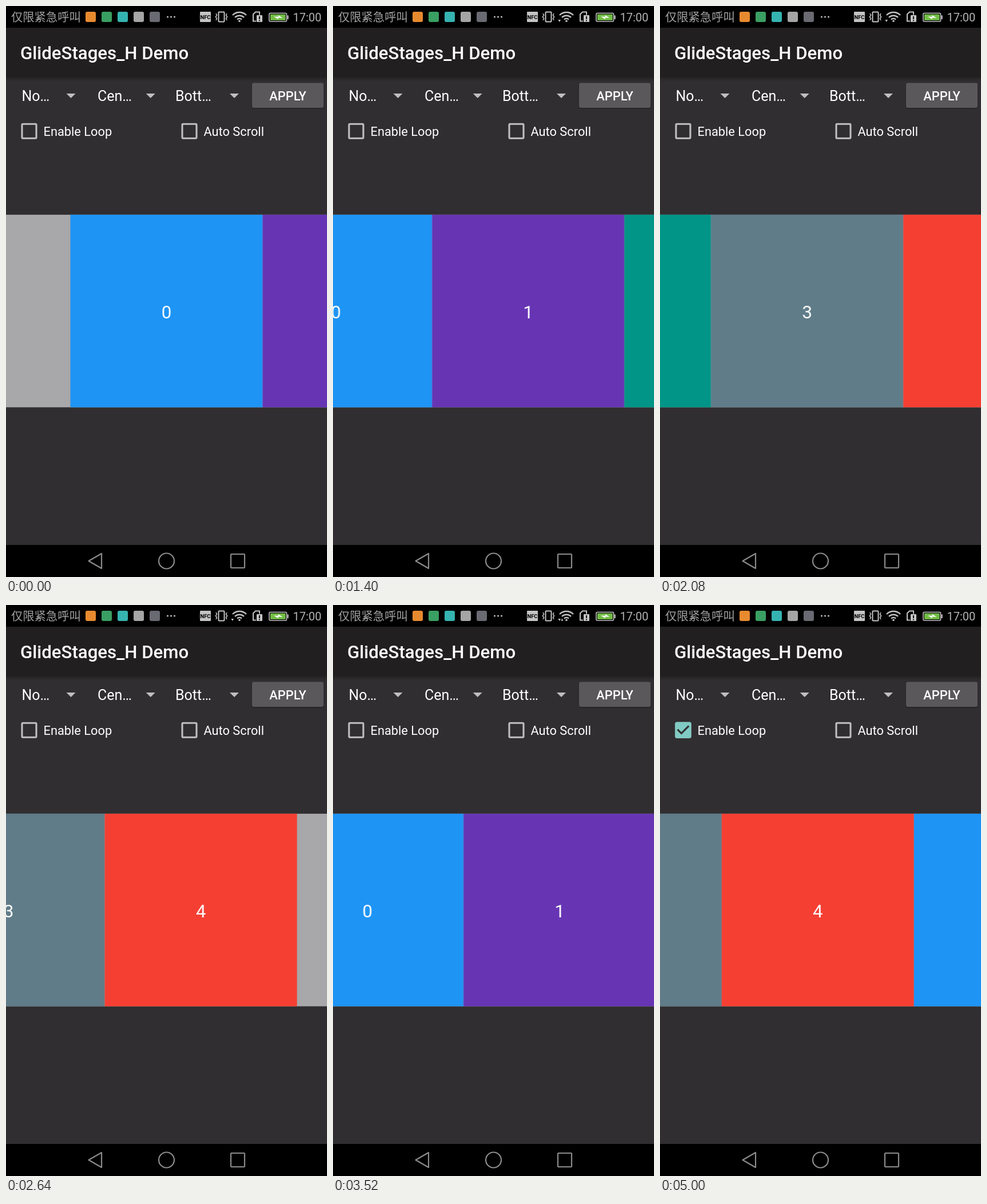
Recreate the animation shown at these times as an HTML page. Size 561 by 998 pixels, loop 5040 ms.

```html
<!DOCTYPE html>
<html lang="en">
<head>
<meta charset="utf-8">
<title>Pager demo</title>
<style>
  html, body { margin: 0; width: 100%; height: 100%; overflow: hidden; background: #302e30; }
  svg { display: block; width: 100%; height: 100%; }
  text { font-family: Roboto, sans-serif; fill: #fff; }
  .title { font-size: 31.2px; font-weight: 500; }
  .pick { font-size: 25px; }
  .label { font-size: 21.8px; }
  .button { font-size: 21.8px; font-weight: 500; text-anchor: middle; }
  .num { font-size: 31.2px; text-anchor: middle; }
  .carrier { font: 20.3px "Noto Sans CJK SC", "Noto Sans CJK", sans-serif; fill: #a3a3a3; }
  .clock { font-size: 20px; fill: #b4b4b4; }
  .nfc { font-size: 9.5px; font-weight: 700; fill: #000; text-anchor: middle; }
  .line { fill: none; stroke: #c4c4c4; stroke-width: 2; }
  .nav { fill: none; stroke: #8b8b8b; stroke-width: 2.2; }
  .box { fill: none; stroke: #c1c0c1; stroke-width: 3.1; }
  .page { y: 364.8px; width: 336px; height: 336.6px; }

  .strip { animation: swipe 5.04s ease infinite; }
  .wrap { animation: wrap 5.04s step-end infinite; }
  .down { animation: down 5.04s step-end infinite; }
  .up { animation: up 5.04s step-end infinite; }
  .hole { transform-origin: 40.5px 218.7px; animation: fill 5.04s linear infinite; }
  .tick { fill: none; stroke: #302e30; stroke-width: 3.1; stroke-dasharray: 30;
          animation: tick 5.04s linear infinite; }
  .ripple { fill: #fff; opacity: 0; transform-origin: 0 0; animation: ripple 5.04s linear infinite; }

  /* each pair of stops is one swipe by one page (336px) */
  @keyframes swipe {
    0%, 25.496% { transform: translateX(0); }
    29.94% { transform: translateX(-336px); }
    35%, 35.417% { transform: translateX(-672px); }
    40.476%, 40.873% { transform: translateX(-1008px); }
    45.933%, 51.657% { transform: translateX(-1344px); }
    56.726%, 57.242% { transform: translateX(-1008px); }
    62.5%, 63.393% { transform: translateX(-672px); }
    68.413%, 68.75% { transform: translateX(-336px); }
    73.77%, 94.98% { transform: translateX(0); }
    100% { transform: translateX(336px); }
  }
  @keyframes wrap {
    0% { visibility: hidden; }
    84.9%, 100% { visibility: visible; }
  }
  @keyframes down {
    0% { visibility: hidden; }
    15.86% { visibility: visible; }
    91.27%, 100% { visibility: hidden; }
  }
  @keyframes up {
    0% { visibility: hidden; }
    59.52% { visibility: visible; }
    74.59%, 100% { visibility: hidden; }
  }
  @keyframes fill {
    0%, 85.2% { transform: scale(1); }
    87.7%, 100% { transform: scale(0); }
  }
  @keyframes tick {
    0%, 87.7% { stroke-dashoffset: 30; }
    90.6%, 100% { stroke-dashoffset: 0; }
  }
  @keyframes ripple {
    0%, 84.89% { opacity: 0; transform: translate(35px, 215px) scale(.4); }
    84.9% { opacity: .05; transform: translate(35px, 215px) scale(.4); }
    89% { opacity: .12; transform: translate(40.5px, 218.7px) scale(1); }
    94.5%, 100% { opacity: 0; transform: translate(40.5px, 218.7px) scale(1); }
  }
</style>
</head>
<body>
<svg viewBox="0 0 561 998" preserveAspectRatio="none">
  <defs>
    <linearGradient id="shade" x2="0" y2="1">
      <stop stop-color="#000" stop-opacity=".22"/>
      <stop offset="1" stop-color="#000" stop-opacity="0"/>
    </linearGradient>
    <path id="arrow" d="M-8 153h16l-8 8z" fill="#c0bfc0"/>
  </defs>

  <rect width="561" height="998" fill="#302e30"/>
  <rect y="38" width="561" height="87" fill="#221f21"/>
  <rect y="125" width="561" height="7" fill="url(#shade)"/>
  <rect width="561" height="38" fill="#000"/>

  <!-- status bar -->
  <text class="carrier" x="9" y="27">仅限紧急呼叫</text>
  <rect x="139" y="10" width="18" height="18" rx="3" fill="#e78a2f"/>
  <rect x="167" y="10" width="18" height="18" rx="3" fill="#3a9f62"/>
  <rect x="195" y="10" width="18" height="18" rx="3" fill="#35b3b1"/>
  <rect x="223" y="10" width="18" height="18" rx="3" fill="#a5a5a5"/>
  <rect x="251" y="10" width="18" height="18" rx="3" fill="#696a72"/>
  <g fill="#c4c4c4">
    <circle cx="282.5" cy="19" r="1.5"/>
    <circle cx="288.5" cy="19" r="1.5"/>
    <circle cx="294.5" cy="19" r="1.5"/>
    <rect x="339" y="10" width="19" height="18" rx="1"/>
  </g>
  <text class="nfc" x="348.5" y="22.5">NFC</text>
  <rect class="line" x="371.5" y="10.5" width="10" height="17" rx="1"/>
  <path class="line" style="stroke-width:1.6" d="M367 13l1.5 3-2 3 2 3-1.5 3M386 13l-1.5 3 2 3-2 3 1.5 3"/>
  <path class="line" style="stroke-width:2.4" d="M396 16a17 17 0 0 1 24 0M400 20a11.5 11.5 0 0 1 16 0M404 23.6a6 6 0 0 1 8 0"/>
  <circle cx="408" cy="26.3" r="1.8" fill="#c4c4c4"/>
  <path class="down" d="M393.5 24h4.5l-2.2 4z" fill="#c4c4c4"/>
  <path class="up" d="M398.3 27.5h4l-2-4z" fill="#c4c4c4"/>
  <path class="line" d="M437 26.5h-5v-12l4-4h7v5"/>
  <rect x="438" y="16" width="10" height="12" rx="1" fill="#c4c4c4"/>
  <path d="M443 18v5M443 24.5v2" stroke="#000" stroke-width="1.8"/>
  <rect class="line" style="stroke-width:1.6" x="460" y="12.5" width="30.5" height="14.5" rx="2"/>
  <rect x="491.5" y="16.5" width="2.2" height="6.5" fill="#c4c4c4"/>
  <rect x="462" y="14.5" width="26.5" height="10.5" fill="#72bd45"/>
  <path d="M468 18.5l8 .3-.5-2.8 8 4.8-8-.3.5 2.8z" fill="#fff"/>
  <text class="clock" x="501.5" y="26.5">17:00</text>

  <text class="title" x="25" y="93.3">GlideStages_H Demo</text>

  <!-- controls -->
  <text class="pick" x="27.5" y="165.5">No…</text>
  <text class="pick" x="160" y="165.5">Cen…</text>
  <text class="pick" x="296" y="165.5">Bott…</text>
  <use href="#arrow" x="113.5"/>
  <use href="#arrow" x="252.7"/>
  <use href="#arrow" x="399"/>
  <rect x="429.5" y="135.5" width="126" height="44" rx="3" fill="#000" opacity=".25"/>
  <rect x="430" y="134.5" width="125" height="43.5" rx="3" fill="#5a585a"/>
  <text class="button" x="492.5" y="164.5">APPLY</text>

  <circle class="ripple" r="34"/>
  <rect class="box" x="28" y="206.2" width="25" height="25" rx="1.5"/>
  <g class="wrap">
    <rect x="26.4" y="204.6" width="28.2" height="28.2" rx="3" fill="#80cbc4"/>
    <rect class="hole" x="29.6" y="207.8" width="21.8" height="21.8" fill="#302e30"/>
    <path class="tick" d="M30.7 217.6l6.7 6.7 12.9-12.9"/>
  </g>
  <text class="label" x="65.5" y="226.7">Enable Loop</text>
  <rect class="box" x="308" y="206.2" width="25" height="25" rx="1.5"/>
  <text class="label" x="345.5" y="226.7">Auto Scroll</text>

  <!-- pager -->
  <rect y="364.8" width="561" height="336.6" fill="#a8a7a9"/>
  <g class="strip">
    <g class="wrap">
      <rect class="page" x="-559.5" fill="#607c89"/>
      <rect class="page" x="-223.5" fill="#f53f33"/>
      <text class="num" x="-391.5" y="545.6">3</text>
      <text class="num" x="-55.5" y="545.6">4</text>
    </g>
    <rect class="page" x="112.5" fill="#1e94f5"/>
    <rect class="page" x="448.5" fill="#6735b4"/>
    <rect class="page" x="784.5" fill="#009587"/>
    <rect class="page" x="1120.5" fill="#607c89"/>
    <rect class="page" x="1456.5" fill="#f53f33"/>
    <text class="num" x="280.5" y="545.6">0</text>
    <text class="num" x="616.5" y="545.6">1</text>
    <text class="num" x="952.5" y="545.6">2</text>
    <text class="num" x="1288.5" y="545.6">3</text>
    <text class="num" x="1624.5" y="545.6">4</text>
  </g>

  <!-- navigation bar -->
  <rect y="942" width="561" height="56" fill="#000"/>
  <path class="nav" d="M144.5 970l22.5-13v26z" stroke-linejoin="round"/>
  <circle class="nav" cx="280.5" cy="970" r="13.5"/>
  <rect class="nav" x="393" y="958" width="24" height="24" rx="1"/>
</svg>
</body>
</html>
```
